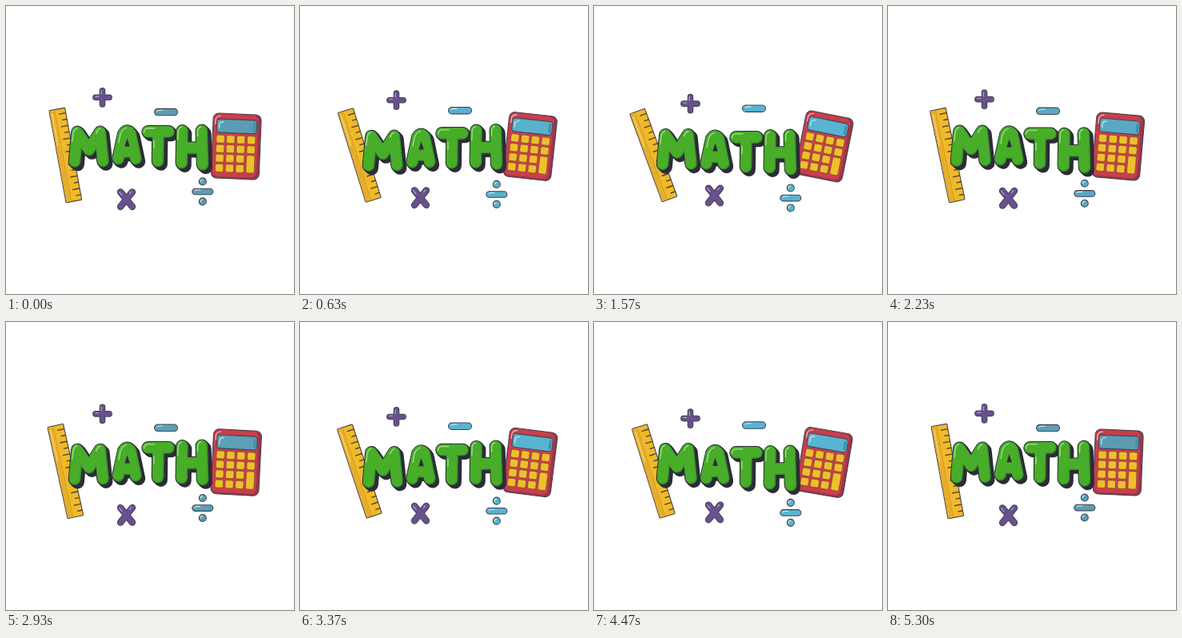
Animation, 360 px wide and 360 px high, one loop 5.33 s. Source, as an HTML page:

```html
<!DOCTYPE html>
<html lang="en">
<head>
<meta charset="utf-8">
<title>Math</title>
<style>
  html, body { margin: 0; width: 100%; height: 100%; overflow: hidden; background: #fff; }
  svg { display: block; width: 100vw; height: 100vh; }
  .round { stroke-linecap: round; stroke-linejoin: round; fill: none; }
  .ink { stroke: #454350; stroke-width: 1.1; }
  .key { stroke: #8c4a35; stroke-width: .8; }
  .blue { fill: var(--blue); }
  .shine { stroke: #fff; stroke-width: 1.1; opacity: .75; }
</style>
</head>
<body>
<svg id="stage" viewBox="0 0 360 360" role="img" aria-label="MATH"></svg>
<script>
const CYCLE = 2665; // the 5330 ms loop holds two swings
const NS = "http://www.w3.org/2000/svg";
const INK = "#454350", SHADOW = "#2d2b39";
const stage = document.getElementById("stage");
const parts = [];

function add(parent, tag, attrs) {
  const el = document.createElementNS(NS, tag);
  for (const key in attrs) el.setAttribute(key, attrs[key]);
  parent.appendChild(el);
  return el;
}

// 0 at time "start", 1 half a cycle later
const swing = (t, start) => (1 - Math.cos((t - start) / CYCLE * 2 * Math.PI)) / 2;

function part(start, place) {
  const g = add(stage, "g", {});
  parts.push({ g, start, place });
  return g;
}

const slide = (x, from, to) => k => `translate(${x} ${from + (to - from) * k})`;
const tilt = (x, y, from, to) => k => `translate(${x} ${y}) rotate(${from + (to - from) * k})`;

function box(g, x, y, width, height, rx, fill, cls = "ink") {
  return add(g, "rect", { x, y, width, height, rx, fill, class: cls });
}

function line(g, d, stroke, width, more = {}) {
  return add(g, "path", { d, stroke, "stroke-width": width, class: "round", ...more });
}

function shine(g, d) {
  add(g, "path", { d, class: "round shine" });
}

function ruler() {
  const g = part(-115, tilt(74.3, 186.5, -10.2, -22.2));
  box(g, -10, -58.5, 20, 117, 1, "#efba28");
  box(g, -9.5, -58, 5, 116, 0, "#e6ad2c", "");
  line(g, "M-3.2 -57V57", "#cf9430", 0.9);
  line(g, "M-7 -54V-14", "#f8da78", 1.2);
  for (let i = 0; i < 14; i++) {
    const y = -52 + i * 8;
    line(g, `M9.5 ${y}H${i % 2 ? 4.5 : 1.5}`, "#54402c", 1.4);
  }
}

function calculator() {
  const g = part(40, tilt(287.7, 175.5, 2.3, 12));
  box(g, -30, -40.5, 60, 81, 7, "#9c3646");
  box(g, -29.3, -39.8, 55.5, 78, 6.5, "#c93e4c", "");
  shine(g, "M-27 -27V-33Q-26 -37 -21 -37.5");
  box(g, -25.3, -33.5, 50.3, 17, 4, "", "ink blue");
  line(g, "M22 -29.5V-20.5", "#4b8ba3", 3);
  shine(g, "M-22 -22V-27Q-21.5 -30 -17 -30");
  const cols = [-20, -7.2, 5.6, 18.6], rows = [-8.5, 3.5, 15.5, 27.7];
  cols.forEach((x, c) => rows.forEach((y, r) => {
    if (c === 3 && r === 3) return;
    const tall = c === 3 && r === 2;
    box(g, x - 5.2, y - 5, 10.4, tall ? 22.2 : 10, 2.2, "#ecc02b", "key");
  }));
}

function cross(place, d, width, glint) {
  const g = part(40, place);
  line(g, d, INK, width + 2);
  line(g, d, "#69508f", width);
  line(g, glint, "#bcabd4", 1.1);
}

function minus() {
  const g = part(40, slide(200, 132.6, 127.9));
  box(g, -14.5, -4.2, 29, 8.4, 4.2, "", "ink blue");
  shine(g, "M-11 -1Q-10 -2.3 -8 -2.3H-4");
}

function divide() {
  const g = part(40, slide(245.8, 232, 240.5));
  box(g, -13, -3.8, 26, 7.6, 3.8, "", "ink blue");
  shine(g, "M-9.5 -1Q-9 -2 -7 -2H-3");
  for (const cy of [-12.6, 12.4]) {
    add(g, "circle", { cx: 0, cy, r: 4.5, class: "ink blue" });
    shine(g, `M-2.5 ${cy}Q-2.3 ${cy - 2} -0.3 ${cy - 2.4}`);
  }
}

function letter(start, d, glint, hole) {
  const g = part(start, slide(0, -3.7, 3.7));
  for (let i = 0; i <= 4; i++) {
    line(g, d, SHADOW, 16.6, { transform: `translate(${i * 0.9} ${i * 0.9})` });
  }
  line(g, d, "#38912a", 14.6);
  line(g, d, "#48ad28", 13, { transform: "translate(-.6 -.6)" });
  if (hole) add(g, "path", { d: hole, fill: SHADOW });
  line(g, glint, "#a6e08c", 1.3);
}

ruler();
calculator();
cross(slide(120.5, 114.3, 122.6), "M0 -8.6V8.6M-8.6 0H8.6", 5.6, "M-1.3 -8.5V-4M-8.5 -1.2H-5");
cross(slide(150.5, 241.7, 236.7), "M-7.4 -9.2L7.4 9.2M7.4 -9.2L-7.4 9.2", 6.6, "M-8.8 -9L-5.5 -5M6 -9.5L4 -7");
minus();
divide();
letter(-340, "M86 197L89.3 160.5L104 182.5L117.8 160.5L121.5 196.5",
  "M82.8 172L84.1 161.5Q85.3 156.5 88.8 155.5M112.8 162Q114.3 156.5 117.8 156");
letter(-100, "M140.5 194.5L147.3 163.5Q151.5 157 155.8 163.5L162.3 194.5M145.5 186H157.5",
  "M141 174.5L143 164Q145.5 157 150.5 156", "M151.5 169L154.8 179H148.3Z");
letter(130, "M177.5 160.8H203.5M190.5 162L190 197.5",
  "M172.5 161.3Q173 156.8 177 156.3H186M185 172V181");
letter(370, "M220.5 158.8L219.8 198.5M244.8 158.3L246 200.5M221 180H245",
  "M214.8 170L215.3 158.5Q216.3 154.5 219.5 153.8M239.6 165V158Q240.6 154 243.6 153.5");

const dull = [90, 157, 179], bright = [87, 181, 210];

function draw() {
  const t = performance.now() % (CYCLE * 2);
  for (const p of parts) p.g.setAttribute("transform", p.place(swing(t, p.start)));
  const k = Math.min(1, swing(t, 40) * 2);
  const blue = dull.map((c, i) => Math.round(c + (bright[i] - c) * k));
  stage.style.setProperty("--blue", `rgb(${blue})`);
  requestAnimationFrame(draw);
}
draw();
</script>
</body>
</html>
```
